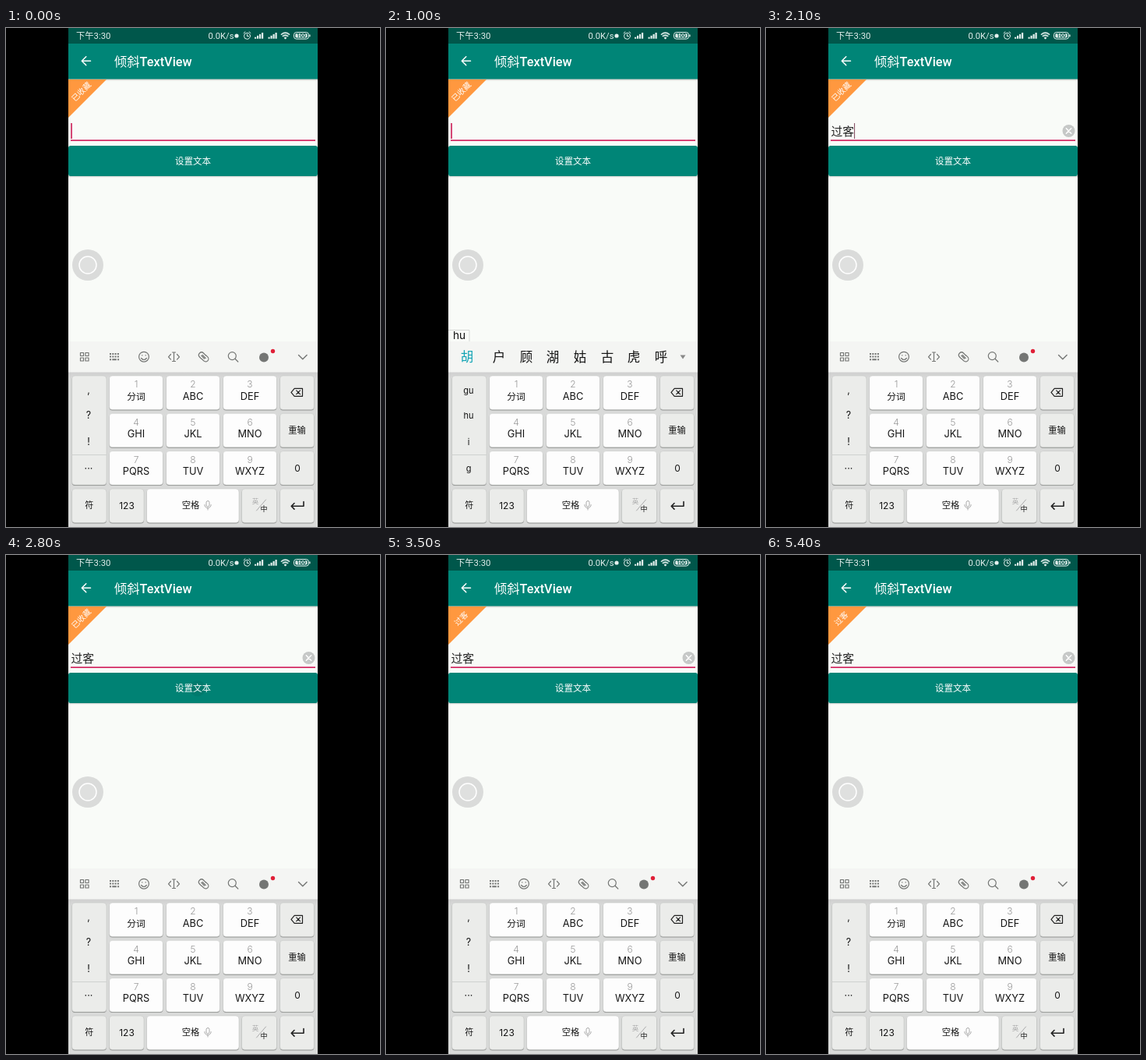
An HTML page for the animation above (5.5 s loop, 480 px wide and 640 px high).

```html
<!DOCTYPE html>
<html lang="zh">
<head>
<meta charset="utf-8">
<style>
  html, body { margin: 0; width: 100%; height: 100%; overflow: hidden; background: #000; }
  svg { display: block; width: 480px; height: 640px; }
  text { font-family: Inter, "Noto Sans CJK SC", "Noto Sans CJK", sans-serif; white-space: pre; }
  .rob { font-family: Roboto, "Noto Sans CJK SC", "Noto Sans CJK", sans-serif; }
  .line { fill: none; stroke-linecap: round; stroke-linejoin: round; }
</style>
</head>
<body>
<svg viewBox="0 0 480 640">
  <defs>
    <clipPath id="buttonClip"><rect x="80" y="151" width="320" height="39" rx="3"/></clipPath>
    <clipPath id="phoneClip"><rect x="80" width="320" height="640"/></clipPath>
    <linearGradient id="shade" x2="0" y2="1">
      <stop stop-color="#000" stop-opacity=".25"/><stop offset="1" stop-color="#000" stop-opacity="0"/>
    </linearGradient>
    <linearGradient id="deck" x2="0" y2="1">
      <stop stop-color="#cfcfcf"/><stop offset=".04" stop-color="#d9dad9"/><stop offset="1" stop-color="#d9dad9"/>
    </linearGradient>
  </defs>
  <g clip-path="url(#phoneClip)">
    <rect x="80" width="320" height="640" fill="#f9fbf8"/>
    <rect x="80" y="65" width="320" height="3" fill="url(#shade)"/>
    <rect x="80" y="20" width="320" height="45.5" fill="#008577"/>
    <rect x="80" width="320" height="20" fill="#00574b"/>

    <!-- status bar -->
    <g fill="#e4efed">
      <text id="clock" class="rob" x="90" y="14" font-size="11.3"></text>
      <text class="rob" x="259.5" y="14" font-size="11.2">0.0K/s</text>
      <circle cx="296" cy="10" r="2.6"/>
      <g class="line" stroke="#e4efed">
        <circle cx="309.5" cy="10.3" r="4"/>
        <path d="M309.5 8v2.6h2M305 6.6l2-1.8M314 6.6l-2-1.8"/>
      </g>
      <g id="signals"></g>
      <path d="M353 8Q358.500 3 364 8L358.500 14.500Z" fill="#e4efed" opacity=".25"/>
      <path class="line" stroke="#e4efed" stroke-width="1.3" d="M353.300 8.300Q358.500 3.700 363.700 8.300M355.200 10.600Q358.500 7.900 361.800 10.600"/>
      <circle cx="358.500" cy="13" r="1.3"/>
      <path id="wifiArrow" d="M362 10.500v4M360.500 13l1.500 1.700 1.500-1.700" class="line" stroke="#e4efed"/>
      <rect x="369.500" y="5.500" width="19" height="8.600" rx="3.200" fill="none" stroke="#e4efed"/>
      <rect x="371.300" y="7.100" width="15.400" height="5.400" rx="1.700"/>
      <rect x="389.300" y="8.300" width="1.300" height="3" rx=".6"/>
      <text class="rob" x="379" y="12.300" font-size="7" font-weight="700" text-anchor="middle" fill="#00574b">100</text>
    </g>

    <!-- app bar -->
    <path d="M108.500 42.300H97.500M102.800 36.800L97.300 42.300L102.800 47.800" class="line" stroke="#fff" stroke-width="1.5"/>
    <text class="rob" x="139" y="48.500" font-size="16.300" fill="#fff" font-weight="300">倾斜<tspan font-weight="500">TextView</tspan></text>

    <!-- corner tag and input -->
    <path d="M80 66H129L80 115Z" fill="#ff983f"/>
    <text id="tag" class="rob" transform="translate(96.500 81.500) rotate(-45)" y="3.700" font-size="10" text-anchor="middle" fill="#fff"></text>
    <rect x="83" y="143.300" width="314" height="1.700" fill="#d32661"/>
    <text id="entry" class="rob" x="83.500" y="138" font-size="14.800" fill="#222">过客</text>
    <rect id="caret" y="122" height="20"/>
    <g id="clear">
      <circle cx="388.500" cy="132" r="8" fill="#c6c8c7"/>
      <path d="M385.300 128.800l6.400 6.400m0-6.400l-6.400 6.400" class="line" stroke="#fff" stroke-width="1.500"/>
    </g>

    <!-- button -->
    <rect x="80" y="189" width="320" height="3" fill="url(#shade)"/>
    <rect x="80" y="151" width="320" height="39" rx="3" fill="#008577"/>
    <g clip-path="url(#buttonClip)">
      <rect id="press" x="80" y="151" width="320" height="39"/>
      <circle id="ripple" cx="246" cy="171"/>
    </g>
    <text class="rob" x="240" y="175" font-size="11.500" text-anchor="middle" fill="#fff">设置文本</text>

    <!-- floating ball -->
    <circle cx="105" cy="304" r="20" fill="#dadbda"/>
    <circle cx="105" cy="304" r="11" fill="#dfe0df" stroke="#fff" stroke-width="1.500"/>

    <!-- keyboard -->
    <rect x="80" y="402" width="320" height="39.500" fill="#f4f5f3"/>
    <g id="toolbar" class="line" stroke="#747674" stroke-width="1.200">
      <path d="M95.500 416.500h4v4h-4zM102 416.500h4v4h-4zM95.500 423h4v4h-4zM102 423h4v4h-4z"/>
      <path d="M133 418h12M133 421.500h12" stroke-width="2" stroke-dasharray="2 1.300" stroke-linecap="butt"/>
      <path d="M133 425.200h2m1.300 0h5.500m1.300 0h2" stroke-width="2" stroke-linecap="butt"/>
      <circle cx="177" cy="421.700" r="6.400"/>
      <path d="M173.600 423.500q3.400 4 6.800 0M174.800 419.500v.5M179.200 419.500v.5"/>
      <path d="M211.500 418.500l-3 3.300 3 3.300M219.500 418.500l3 3.300-3 3.300M213.500 416h4M213.500 427.500h4M215.500 416v11.500"/>
      <path d="M254.500 424l-3.800-3.800M250.500 424.200l-2-2.200a3.500 3.500 0 0 1 5-5l3 3M252.200 419.500l4 4M256.500 419.600l2.300 2.300a3.500 3.500 0 0 1-5 5l-2.800-2.700"/>
      <circle cx="290.300" cy="420.600" r="5"/><path d="M294 424.300l3.800 3.700"/>
      <circle cx="331" cy="422.500" r="6" fill="#747674" stroke="none"/>
      <circle cx="342.500" cy="414.500" r="2.700" fill="#e02038" stroke="none"/>
      <path d="M375.500 419.500l5.300 5.300 5.300-5.300" stroke-width="1.400"/>
    </g>
    <g id="typing">
      <path id="pinyinBox" fill="none" stroke="#d5d7d5"/>
      <text id="pinyin" x="86" y="398.500" font-size="13.700" fill="#111"></text>
      <g id="words"></g>
      <path d="M377.500 419.500h7l-3.500 5z" fill="#888"/>
    </g>
    <rect x="80" y="441.500" width="320" height="199" fill="url(#deck)"/>
    <g id="keys"></g>
    <g id="side"></g>
    <g class="line" stroke="#222" stroke-width="1.200">
      <path d="M366 467.300l4.200-5h10.300v10h-10.300zM372.700 464.900l4.800 4.800m0-4.800l-4.800 4.800"/>
      <path d="M382 607.500v5.800h-15.500M370 609.500l-3.800 3.800 3.800 3.800" stroke-width="1.600"/>
      <g stroke="#aaa" stroke-width="1">
        <rect x="257" y="606.500" width="4" height="7.500" rx="2"/>
        <path d="M254.800 611.500a4.200 4.200 0 0 0 8.400 0M259 616v2M321.500 619l12-14"/>
      </g>
    </g>
  </g>
</svg>
<script>
const $ = id => document.getElementById(id);
const DURATION = 5500;

function add(parent, name, attrs, content = '') {
  const el = document.createElementNS('http://www.w3.org/2000/svg', name);
  for (const key in attrs) el.setAttribute(key, attrs[key]);
  el.textContent = content;
  parent.append(el);
  return el;
}
const label = (parent, x, y, size, content, fill = '#151515', weight = 400) =>
  add(parent, 'text', { x, y, 'font-size': size, fill, 'font-weight': weight, 'text-anchor': 'middle' }, content);

function key(x, y, width, height, fill) {
  add($('keys'), 'rect', { x, y: y + 1, width, height, rx: 4, fill: '#8f918f' });
  add($('keys'), 'rect', { x, y, width, height, rx: 4, fill, stroke: '#bfc1bf', 'stroke-width': .5 });
}

const WHITE = '#fdfdfd', GREY = '#ebecea';
['分词', 'ABC', 'DEF', 'GHI', 'JKL', 'MNO', 'PQRS', 'TUV', 'WXYZ'].forEach((letters, i) => {
  const x = 132.5 + i % 3 * 73, y = 446 + Math.floor(i / 3) * 48.3;
  key(x, y, 69, 43.5, WHITE);
  label($('keys'), x + 34.5, y + 15.3, 12, i + 1, '#999', 300);
  label($('keys'), x + 34.5, y + 30.5, i ? 12.8 : 11.8, letters);
});
key(84.5, 446, 44.5, 140, GREY);
add($('keys'), 'rect', { x: 84.5, y: 547, width: 44.5, height: 1, fill: '#cfd1cf' });
for (let row = 0; row < 3; row++) key(351.5, 446 + row * 48.3, 44, 43.5, GREY);
[[84.5, 44.5], [132.5, 44.5], [180.5, 118.5, WHITE], [302.5, 45], [351.5, 44]]
  .forEach(([x, width, fill = GREY]) => key(x, 591, width, 43.5, fill));
[[373.5, 520.3, 11.3, '重输', '#151515', 500], [374, 569.3, 12, '0'], [106.7, 616.3, 11, '符'],
 [155, 616.5, 12, '123'], [237, 616.3, 11.3, '空格', '#151515', 500], [320, 609.5, 8.5, '英', '#aaa'],
 [331, 620.3, 9, '中']].forEach(args => label($('keys'), ...args));

for (const x of [319, 336.5])
  for (let i = 0; i < 4; i++)
    add($('signals'), 'rect', { x: x + i * 3, y: 11.7 - i * 1.9, width: 2.2, height: 2 + i * 1.9 });

// Input method states: start time, pinyin, syllable choices, candidate words
const SINGLE = [104, 145, 180, 214, 249, 284, 318, 353];
const PAIR = [113, 170, 227, 284, 335];
const PUNCTUATION = [',', '?', '!', '···'];
const STEPS = [
  [0, '', PUNCTUATION, []],
  [600, 'g', ['g', 'h', 'i', '4'], [...'个和好给会还该后']],
  [900, 'hu', ['gu', 'hu', 'i', 'g'], [...'胡户顾湖姑古虎呼']],
  [1100, 'guo', ['gun', 'guo', 'hun', 'huo'], [...'过国或果活火货锅']],
  [1300, "guo'l", ['gun', 'guo', 'hun', 'huo'], ['过来', '过了', 'HTML', '过客', '过节']],
  [2000, '', PUNCTUATION, []]
];
// Times at which the caret turns on and off
const CARET = [[0, 500], [1000, 1500], [2000, 2500], [3000, 3500], [4000, 4400], [4900, 5400]];

const show = (id, on) => $(id).style.display = on ? '' : 'none';
const clamp = v => Math.max(0, Math.min(1, v));

let shownStep;
function showStep(step) {
  if (step === shownStep) return;
  shownStep = step;
  const [, pinyin, syllables, words] = step;
  show('typing', pinyin);
  show('toolbar', !pinyin);
  $('pinyin').textContent = pinyin;
  $('pinyinBox').setAttribute('d', pinyin.length < 3 ? `M80 387.500H${91 + pinyin.length * 8}V402` : '');
  $('words').replaceChildren();
  $('side').replaceChildren();
  const places = words.length > 5 ? SINGLE : PAIR;
  words.forEach((word, i) => label($('words'), places[i], 428.3, word === 'HTML' ? 15.5 : 16.5, word, i ? '#151515' : '#0fa3b4'));
  const size = pinyin ? 11 : 12.5;
  syllables.forEach((s, i) => label($('side'), 106, [468.5, 501, 535, 568.5][i], size, s));
}

function draw(t) {
  showStep(STEPS.findLast(step => t >= step[0]));
  const entered = t >= 2000;
  show('entry', entered);
  show('clear', entered);
  show('caret', CARET.some(([on, off]) => t >= on && t < off));
  $('caret').setAttribute('x', entered ? 113 : 83.2);
  $('caret').setAttribute('width', entered ? 1.1 : 1.7);
  $('caret').setAttribute('fill', entered ? '#8a5468' : '#cf2a60');
  $('tag').textContent = t >= 3000 ? '过客' : '已收藏';
  $('clock').textContent = t >= 3700 ? '下午3:31' : '下午3:30';
  show('wifiArrow', t >= 4400 && t < 4600);

  const fade = 1 - clamp((t - 3050) / 300);
  $('press').setAttribute('opacity', .19 * clamp((t - 2780) / 180) * fade);
  $('ripple').setAttribute('opacity', t < 2800 ? 0 : .06 * fade);
  $('ripple').setAttribute('r', 10 + 61 * clamp((t - 2800) / 200) + 100 * clamp((t - 3000) / 200));
}

const start = performance.now();
function tick() {
  draw((performance.now() - start) % DURATION);
  requestAnimationFrame(tick);
}
tick();
</script>
</body>
</html>
```
